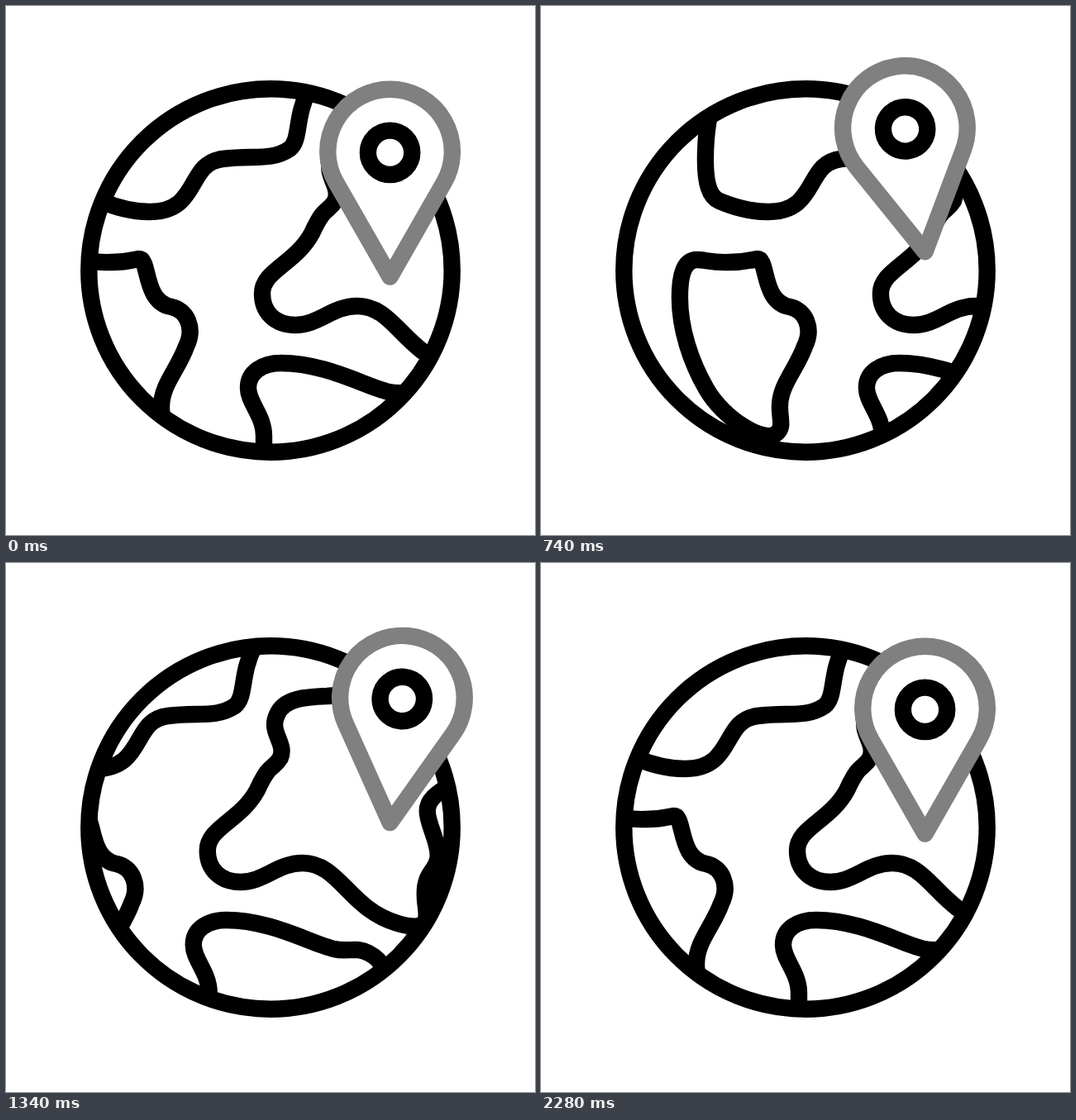
An HTML page that plays this animation: 640x640 px, repeating every 2.4 s.

```html
<!DOCTYPE html>
<html lang="en">
<head>
<meta charset="utf-8">
<title>Globe and pin</title>
<style>
  html, body { margin: 0; width: 100%; height: 100%; overflow: hidden; background: #fff; }
  svg { display: block; width: 100vw; height: 100vh; }
</style>
</head>
<body>
<svg viewBox="0 0 640 640" fill="none" stroke="#000" stroke-width="20.4" stroke-linejoin="round" stroke-linecap="round">
  <defs>
    <clipPath id="disc"><circle cx="320" cy="320" r="222"/></clipPath>
    <g id="land">
      <path d="M118 88C104 115 98 150 98 186C98 215 103 231 115 236C132 243 150 249 174 249C235 249 218 190 262 185C300 180 320 188 343 173C357 162 349 135 367 100L374 84Z"/>
      <path d="M88 307C98 307 106 311 127 310C148 310 158 306 161 306C174 306 166 358 200 364C219 368 229 390 218 412C208 440 188 458 188 485C188 500 193 510 184 517C170 530 120 500 99 463C80 430 67 390 67 353C67 325 72 307 88 307Z"/>
      <path d="M312 570V520C312 495 293 480 293 462C293 443 310 432 333 432C385 432 430 458 463 467C480 471 490 464 505 472C525 482 528 500 528 520V570Z"/>
      <path d="M310 348C310 320 350 312 370 275C386 240 390 250 398 236C406 218 384 205 394 184C402 163 430 162 455 161C490 158 530 158 567 158C605 158 630 195 630 228C630 248 624 254 613 262C592 276 576 284 576 300C576 316 589 335 589 354C589 372 573 372 573 400C573 418 577 422 574 432C571 442 557 441 540 436C480 418 470 363 425 363C395 363 378 386 350 386C325 386 310 370 310 348Z"/>
    </g>
  </defs>
  <g clip-path="url(#disc)">
    <use id="near" href="#land"/>
    <use id="next" href="#land"/>
  </g>
  <circle cx="320" cy="320" r="219.7"/>
  <!-- The pin's tip is its local origin -->
  <g id="pin">
    <path d="M0 0L-65.3 -114.1A75.3 75.3 0 1 1 65.3 -114.1Z" fill="#fff" stroke="#808080"/>
    <circle cy="-150.3" r="26.7"/>
  </g>
</svg>
<script>
  const LOOP = 2400;
  const TURN = 1460; // distance between two copies of the land

  // Keys are [time, value, speed per ms]
  const spin = [
    [0, 0, 0], [530, -85, 0], [740, 99, 1.9], [1100, TURN - 387, 2],
    [1340, TURN - 67, 0.75], [1620, TURN + 39.5, 0], [2180, TURN, 0]
  ];
  const lift = [
    [550, 0, 0], [740, 30, 0.3], [1010, 85, 0],
    [1100, 70, -0.27], [1340, 13.7, -0.17], [1460, 0, 0]
  ];
  const tilt = [
    [545, 0, 0], [740, -9.1, -0.075], [1000, -29, 0], [1100, -25.9, 0.07],
    [1340, 5.5, 0.11], [1440, 13.2, 0], [1665, -7.1, 0],
    [1885, 4, 0], [2090, -1.7, 0], [2290, 0, 0]
  ];

  // Cubic Hermite curve through the keys
  function sample(keys, t) {
    if (t <= keys[0][0]) return keys[0][1];
    const i = keys.findIndex(k => k[0] > t);
    if (i < 0) return keys[keys.length - 1][1];
    const [t0, a, va] = keys[i - 1];
    const [t1, b, vb] = keys[i];
    const span = t1 - t0, u = (t - t0) / span, w = 1 - u;
    return a * w * w * (1 + 2 * u) + b * u * u * (1 + 2 * w)
      + span * u * w * (va * w - vb * u);
  }

  const el = id => document.getElementById(id);
  const near = el('near'), next = el('next'), pin = el('pin');

  function draw(t) {
    const x = sample(spin, t);
    near.setAttribute('transform', `translate(${x} 0)`);
    next.setAttribute('transform', `translate(${x - TURN} 0)`);
    pin.setAttribute('transform',
      `translate(464.6 ${327.6 - sample(lift, t)}) rotate(${sample(tilt, t)})`);
  }

  const start = performance.now();
  function tick() {
    draw((performance.now() - start) % LOOP);
    requestAnimationFrame(tick);
  }
  draw(0);
  requestAnimationFrame(tick);
</script>
</body>
</html>
```
